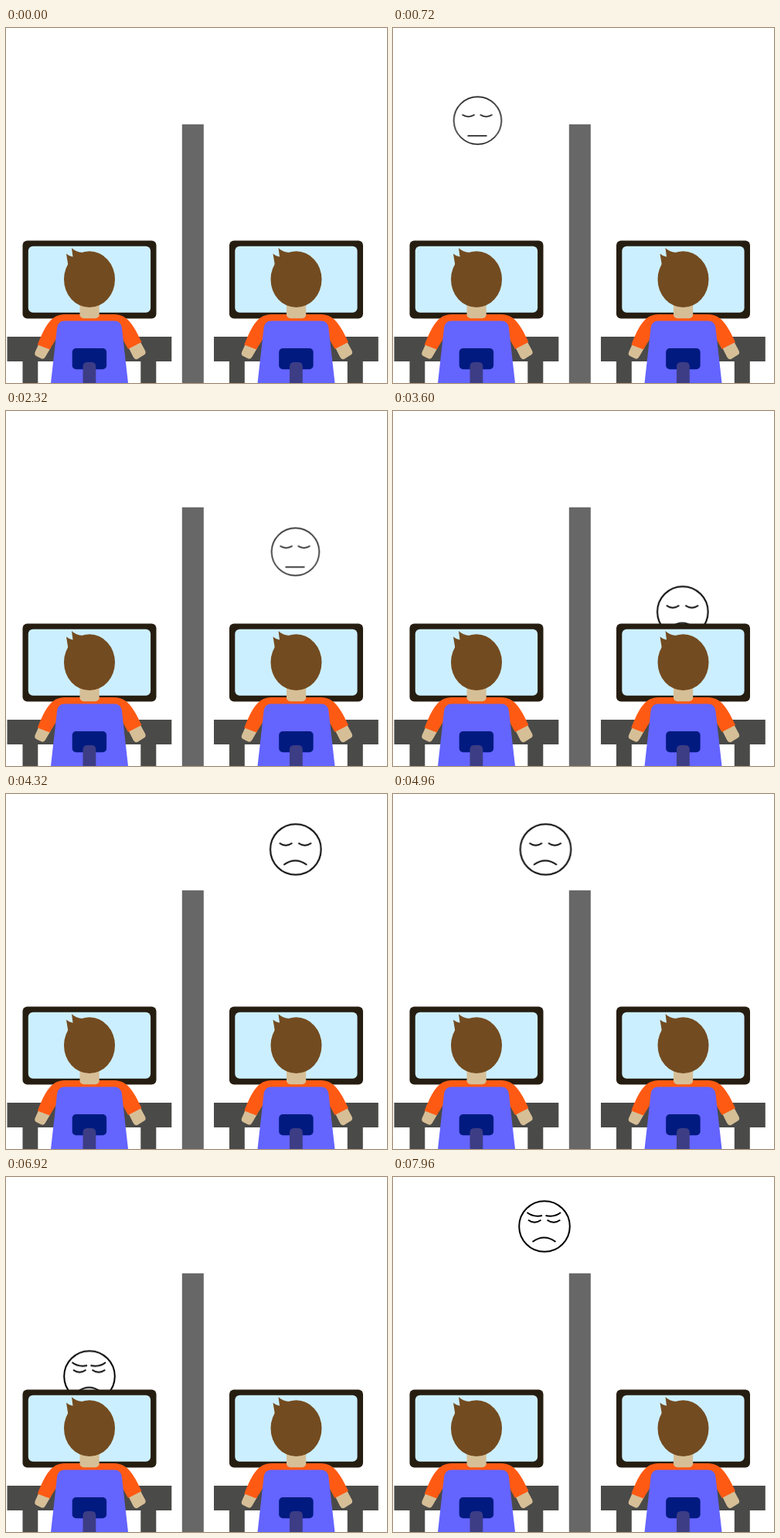
An HTML page without scripts for the animation above (8000 ms loop, 493 by 460 pixels).

```html
<!DOCTYPE html>
<html lang="en">
<head>
<meta charset="utf-8">
<title>Passing a mood over the wall</title>
<style>
  html, body { margin: 0; width: 100%; height: 100%; overflow: hidden; background: #fff; }
  svg { display: block; width: 493px; height: 460px; }

  .face {
    fill: none;
    stroke: #000;
    stroke-width: 2;
    /* small lead keeps each 40 ms step clear of its boundary */
    animation: 8s -2ms steps(24, end) infinite;
  }
  .calm { stroke-width: 1.4; animation-name: calm; }
  .sad { animation-name: sad; }
  .angry { animation-name: angry; }

  /* up, across, down behind the other screen */
  @keyframes calm {
    0% { transform: translate(109.5px, 323px); animation-timing-function: steps(23, end); }
    11.5% { transform: translate(109.5px, 63.4px); }
    23.5% { transform: translate(374.5px, 63.4px); }
    35.5%, 100% { transform: translate(374.5px, 323px); }
  }
  @keyframes sad {
    0%, 42% { transform: translate(374.8px, 323px); }
    54% { transform: translate(374.8px, 71.8px); }
    66% { transform: translate(108.8px, 71.8px); }
    78%, 100% { transform: translate(108.8px, 323px); }
  }
  @keyframes angry {
    0%, 83.5% { transform: translate(108px, 323px); }
    95.5% { transform: translate(108px, 64px); animation-timing-function: steps(9, end); }
    100% { transform: translate(207px, 64px); }
  }
</style>
</head>
<body>
<svg viewBox="0 0 493 460">
  <defs>
    <g id="desk">
      <path fill="#4a4a48" d="M1.5 400H214.3V432H194.3V460H174.3V432H41.3V460H21.5V432H1.5Z"/>
      <rect x="21.5" y="275.5" width="173" height="101" rx="6" fill="#261d11"/>
      <rect x="28.8" y="282.7" width="158.3" height="86" rx="6" fill="#ccefff"/>
      <!-- hands, shirt, neck -->
      <path fill="#d6bf97" d="M43 408L58 414L51 426Q49 430 45 428L39 425Q36 423 38 419Z"/>
      <path fill="#d6bf97" d="M173 405L158 413L164 425Q166 430 170 429L178 424Q182 422 180 418Z"/>
      <path fill="#ff5a13" d="M76 371H140C157 371 165 385 175.5 407L158 416L148 398H68L56.5 416.5L40.8 410.5C51 385 59 371 76 371Z"/>
      <rect x="95.5" y="352" width="25.2" height="24.3" rx="5" fill="#d6bf97"/>
      <!-- head -->
      <ellipse cx="108" cy="325.7" rx="33" ry="36.4" fill="#734b20"/>
      <path fill="#734b20" d="M81 311L78 292.5Q82 296 86.5 296.5L85 285Q90 290.5 100 291L96 305Z"/>
      <!-- chair -->
      <path fill="#6464ff" d="M58 460L66 389Q67 379.5 76 379.5H140Q149 379.5 150 389L158 460Z"/>
      <rect x="85.7" y="415" width="44.4" height="27.3" rx="5" fill="#001a80"/>
      <path fill="#3d3d85" d="M99.5 460V439Q99.5 433 105 433H111Q116.3 433 116.3 439V460Z"/>
    </g>
    <path id="eyes" d="M-21-8.2Q-13-2.3-4.5-8.2M3.5-8.2Q12-2.3 20.3-8.2"/>
    <path id="frown" d="M-15.5 20Q-.5 8.8 14.5 20"/>
  </defs>

  <rect width="493" height="460" fill="#fff"/>
  <rect x="227.8" y="124.8" width="28" height="336" fill="#676767"/>

  <g class="face calm">
    <circle r="30.8"/>
    <path d="M-20-7.6Q-12-2.4-3.8-7.6M3.2-7.6Q11-2.4 19-7.6M-13 19.7H12"/>
  </g>
  <g class="face sad">
    <circle r="32.8"/>
    <use href="#eyes"/>
    <use href="#frown"/>
  </g>
  <g class="face angry">
    <circle r="32.8"/>
    <use href="#eyes"/>
    <use href="#frown"/>
    <path d="M-22.5-18Q-14-11.5-3-14M1.5-14Q13-11.5 21-18"/>
  </g>

  <use href="#desk"/>
  <use href="#desk" x="267.5"/>
</svg>
</body>
</html>
```
